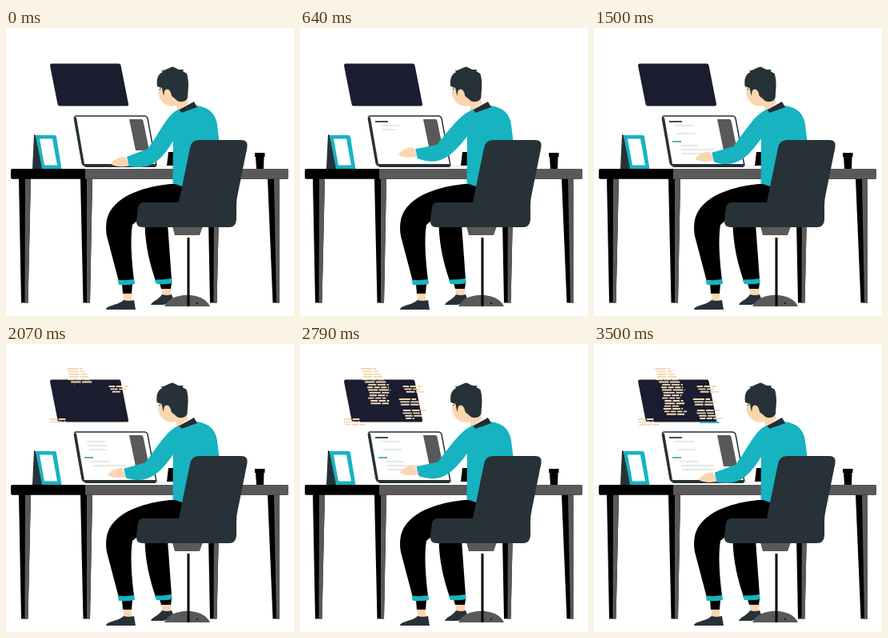
An HTML page that plays this animation: 360x360 px, repeating every 3.57 s.

```html
<!DOCTYPE html>
<html>
<head>
<meta charset="utf-8">
<style>
html, body { margin: 0; width: 100%; height: 100%; overflow: hidden; background: #fff; }
svg { display: block; width: 100vw; height: 100vh; }
.ink { fill: #263238; }
.teal { fill: #17b3c1; }
.skin { fill: #fad6b0; }
.grey { fill: #595959; }
</style>
</head>
<body>
<svg viewBox="0 0 360 360">
  <g id="legs"></g>

  <!-- monitor -->
  <path d="M57 44.500H141Q143 44.500 143.500 46.500L153 95Q153.500 97.500 151 97.500H67Q65 97.500 64.500 95L55 47Q55 44.500 57 44.500Z" fill="#1a1c2f"/>
  <g id="code"></g>

  <!-- laptop -->
  <path d="M88 110H173Q176 110 177 113L188 172H99Q96 172 95 168L85.500 114Q85 110 88 110Z" fill="#fff" stroke="#263238" stroke-width="1.500"/>
  <path d="M86.500 112L96.500 170" stroke="#263238" stroke-width="3"/>
  <path class="grey" d="M154 114H169Q171 114 171.500 116L179 153H162Z"/>
  <g id="page"></g>
  <path class="ink" d="M97 170H187V174H100Q98 174 97 170Z"/>
  <path d="M187 173H203" stroke="#ddd"/>

  <!-- picture stand and cup -->
  <path class="ink" d="M35 133L37 134L46 176H33Z"/>
  <path class="teal" d="M37 134H61Q62.500 134 63 136L69.500 176H45ZM42 138.500L48 171.500H64L58 138.500Z" fill-rule="evenodd"/>
  <path d="M311 156H323.500V161H322.500L322 176H313L312 161H311Z"/>

  <!-- table top -->
  <rect x="6" y="176" width="347" height="12.700" rx="2"/>
  <path class="grey" d="M99 176H351Q353 176 353 178V186.500Q353 188.700 351 188.700H99Z"/>
  <path d="M203 155H210V172H201Z"/>

  <!-- legs and shoes -->
  <path class="skin" d="M147 330H157V342H147ZM195 324H206V335H195Z"/>
  <path d="M145 320H158L157 332H146ZM192 319H207L206 326H194Z"/>
  <path class="ink" d="M125 352C126 346 140 347 147 340Q153 342 160 340L162 352ZM181 346C183 341 192 339 195 333Q201 335 207 333L210 341Q201 345 197 346Z"/>
  <path d="M173.500 245C174 272 180 296 187 316L207 314L202 245Z"/>
  <path d="M220 194C190 195 160 202 142 216C128 227 123 240 126 260L141 317L160 315C157 290 155 264 158 246L170 236L225 225Z"/>
  <path class="teal" d="M139.500 314.500Q150 316 160.500 314L161 320Q151 322 141 321ZM185.500 314.500Q196 315 207 313L208 319Q198 321 188 320Z"/>

  <!-- torso and head -->
  <path class="teal" d="M214 104L238 97C254 99 262 107 264 121L267 145L240 205L208.500 194L209 120Z"/>
  <g id="head">
    <path class="skin" d="M192 72L190.500 82C192 89 195 93 200 96C205 98 209 98 213 97L214 104L228 94L222 68Z"/>
    <path class="ink" d="M189 73C188 65 189 58 196 55L194 53C199 54 203 49 209 48.500L216 52H222L221 54L226 57C228 63 228 70 228 72L227 87C225 93 216 94 212 89L207 85C206 77 201 74 198 79L197 85L195 75Z"/>
    <path d="M191.500 77L193.500 76" stroke="#263238"/>
  </g>
  <path d="M213 104L235 92L239 99L219 106Z" fill="#242c35"/>
  <path id="hand" class="skin" d="M131 170C134 165 141 161 149 161L155 172C147 174 136 174 131 170Z"/>
  <path id="arm" class="teal"/>

  <!-- chair -->
  <path class="grey" d="M208 248H246L242 259H211ZM198 348C206 329 247 329 255 348Z"/>
  <path d="M226.500 262H229.500V348H226.500Z"/>
  <circle cx="239" cy="344" r="1"/>
  <path class="ink" d="M241 140H294Q303 140 301.500 149L290 206Q288 214 288 222V240Q287 249 279 249H171Q162 249 163 240L165 224Q166 218 172 218H216L230 150Q232 140 241 140Z"/>
</svg>
<script>
const LOOP = 3570, BEAT = 1190, STEP = 1000 / 14;
const byId = id => document.getElementById(id);

let seed = 7;
const random = () => (seed = seed * 16807 % 2147483647) / 2147483647;
const between = (a, b) => a + (b - a) * random();

function addPath(parent, attrs) {
  const el = document.createElementNS('http://www.w3.org/2000/svg', 'path');
  for (const name in attrs) el.setAttribute(name, attrs[name]);
  byId(parent).append(el);
  return el;
}

// Table legs taper from 15 to 8.5 units; a black side and a grey side
for (const [top, foot] of [[16, 19], [93, 96.5], [252, 255], [327, 333.5]]) {
  addPath('legs', { d: `M${top} 188h15L${foot + 8.5} 343.500h-8.500Z` });
  addPath('legs', { class: 'grey', d: `M${top + 8} 188h7L${foot + 8.5} 343.500h-4Z` });
}

function addLine(parent, x, y, w, start, stroke, dash = 'none') {
  const el = addPath(parent, { stroke, 'stroke-width': 1.9, 'stroke-dasharray': dash });
  return (t, shown = true) => {
    const done = Math.min(1, Math.max(0, (t - start) / 90));
    el.setAttribute('d', shown && done ? `M${x} ${y}h${w * done}` : '');
  };
}

// Code groups: left edge, first row, number of rows, slant, typing start
const code = [];
for (const [left, top, rows, slant, begin] of [
  [77, 31, 5, 0.1, 1530],
  [83, 47.5, 13, 0.15, 1980],
  [129, 53, 3, 0.5, 1850],
  [124, 69, 3, 0.2, 2300],
  [128, 83, 4, 0.3, 2480],
  [56, 94, 3, 0.1, 1890]
]) {
  for (let i = 0; i < rows; i++) {
    const y = i * 3.35, w = between(19, 29), gap = between(6, 15);
    code.push(addLine('code', left + y * slant + between(-2, 2), top + y, w,
      begin + y * 27, '#f3d9b5', `${gap} 1.500`));
  }
}
code.push(addLine('code', 132, 98, 24, 3060, '#17b3c1'));

// Laptop text: a dark heading, indented rows, one teal row after a blank one
const page = [];
for (let i = 0; i < 9; i++) {
  const x = 100 + i * 1.25, y = 117 + i * 5, start = 285 + i * 145;
  if (i == 0) page[i] = addLine('page', 94, y, 16, start, '#444');
  else if (i == 5) page[i] = addLine('page', 98, y, 11, start, '#56aeb0');
  else if (i != 4) page[i] = addLine('page', x, y, i > 6 ? 41 : 23, start, '#e4e8e6');
}

function render(now) {
  const ms = now % LOOP;
  const t = Math.floor((Math.floor(ms / 10) * 10 + 5) / STEP) * STEP;
  const phase = t % BEAT / BEAT;
  const lift = (1 - Math.cos(2 * Math.PI * phase)) / 2;
  const wrist = (x, y) => `${x - 7 * lift} ${y - 10 * lift} `;
  const elbow = (x, y) => `${x - 6 * lift} ${y - 5 * lift} `;

  byId('arm').setAttribute('d',
    `M216 102C201 107 ${elbow(191, 134)} ${elbow(177, 151)}L${wrist(151, 161)}L${wrist(154, 173)}` +
    `C${elbow(179, 177)} ${elbow(192, 170)} 211 ${138 - 5 * lift}L232 120Z`);
  byId('hand').setAttribute('transform', `translate(${-8 * lift} ${-12 * lift})`);
  byId('head').setAttribute('transform', `translate(${-0.7 * lift} 0)`);

  for (const draw of code) draw(t);
  const dim = phase > 0.58 && phase < 0.8;
  page.forEach((draw, i) => draw(t, i == 2 ? phase > 0.45 && phase < 0.8 : i % 8 || !dim));
}

const begin = performance.now();
function tick() {
  render(performance.now() - begin);
  requestAnimationFrame(tick);
}
tick();
</script>
</body>
</html>
```
